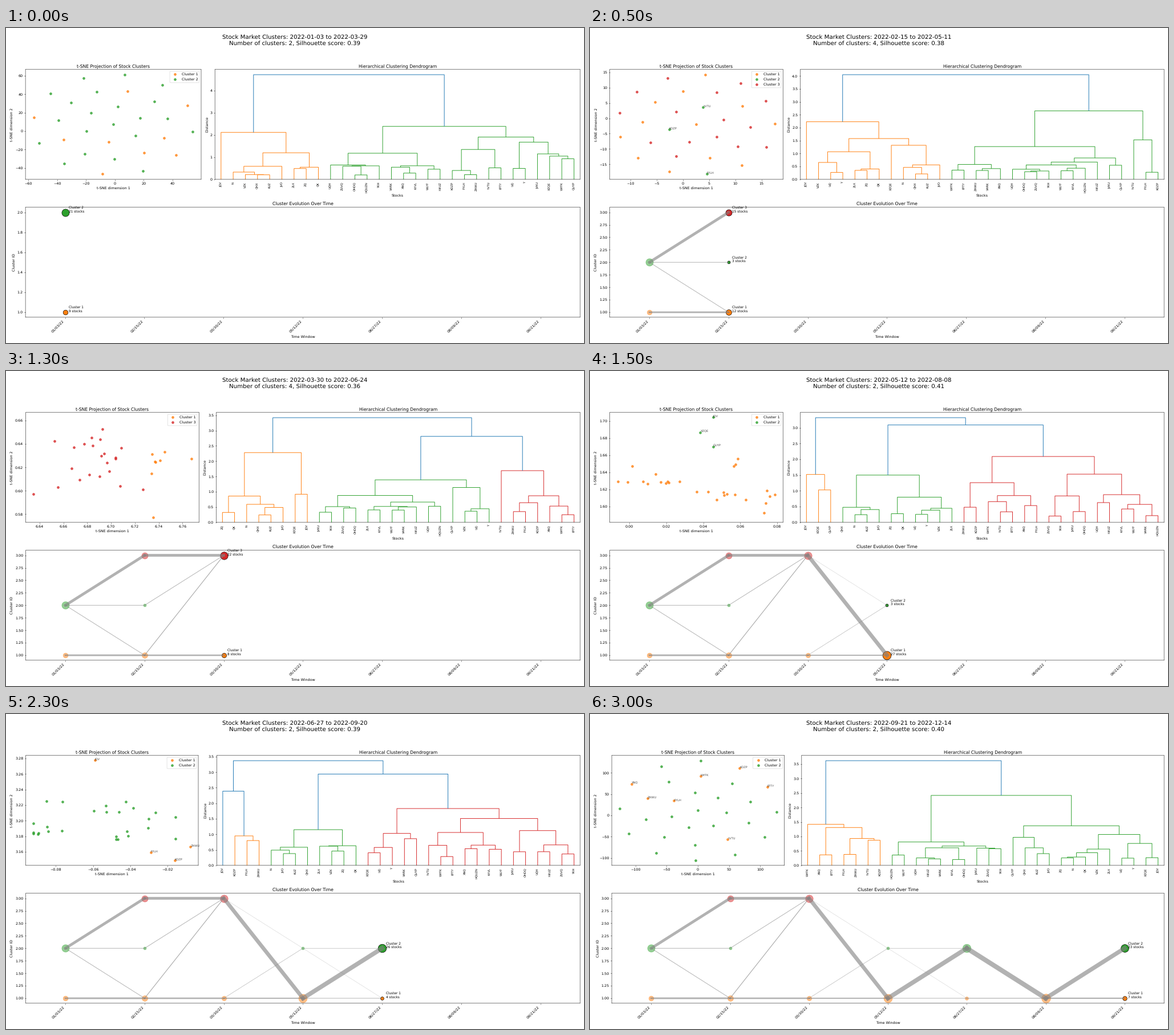
Animation, 1013 px wide and 553 px high, one loop 3500 ms. Source, as a matplotlib script:

```python
from math import cos, radians, sin, tau

import matplotlib.pyplot as plt
import numpy as np
from matplotlib.animation import FuncAnimation

WIDTH, HEIGHT, DPI = 1013, 553, 46
RIGHT = 1006.1
TOP_ROW, BOTTOM_ROW, ROW_HEIGHT = 72.8, 314.8, 193
STOCKS = 30
RING_RADII = (1, 0.69, 0.36)
REACH = 0.5 / 1.1  # half the axes, less the default 5% margins

plt.rcParams.update({"path.snap": False, "text.hinting": "none"})
fig = plt.figure(figsize=((WIDTH + 0.01) / DPI, (HEIGHT + 0.01) / DPI), dpi=DPI)
fig.patch.set_facecolor("white")
heading = fig.suptitle("", fontsize=16)
scatter_ax, tree_ax, flow_ax = (fig.add_axes([0.1, 0.1 + 0.3 * i, 0.3, 0.2]) for i in range(3))

windows = []


def rings(counts, phases, main, members=None):
    """Points on concentric ellipses; all stocks not listed in members join the main cluster."""
    points = []
    for count, phase, radius in zip(counts, phases, RING_RADII):
        for i in range(count):
            angle = radians(90 - phase) - tau * i / count
            points.append((0.5 + REACH * radius * cos(angle), 0.5 + REACH * radius * sin(angle)))
    points.append((0.5, 0.5))
    members = members or {}
    listed = {i for group in members.values() for i in group}
    groups = {cluster: [points[i] for i in group] for cluster, group in members.items()}
    groups[main] = [p for i, p in enumerate(points) if i not in listed]
    return dict(sorted(groups.items()))


def clouds(seed, blobs, outliers=None):
    """Random clouds, each given as (cluster, count, centre x, centre y, spread x, spread y)."""
    rng = np.random.default_rng(seed)
    groups = {cluster: list(points) for cluster, points in (outliers or {}).items()}
    for cluster, count, x, y, dx, dy in blobs:
        cloud = rng.normal((x, y), (dx, dy), (count, 2)).clip(0.5 - REACH, 0.5 + REACH)
        groups.setdefault(cluster, []).extend(cloud)
    return dict(sorted(groups.items()))


def merge_heights(seed, tall):
    """Heights between neighbouring leaves: the tall merges by position, low ones elsewhere."""
    low = np.random.default_rng(seed).uniform(0.2, 0.68, STOCKS - 1)
    return [tall.get(i, h) for i, h in enumerate(low)]


def add_window(start, end, score, count, edges, xlim, ylim, leaves, tall, groups, names=None):
    windows.append(dict(start=start, end=end, score=score, count=count, edges=edges,
                        xlim=xlim, ylim=ylim, leaves=leaves.split(),
                        gaps=merge_heights(len(windows), tall),
                        groups=groups, names=names or {}))


add_window(
    "2022-01-03", "2022-03-29", 0.39, 2, (34.1, 342), (-62.1, 59.8), (-52.5, 67),
    "JQV N VZK QHX KUZ JVO ZLX ZQ QK UQH ZUVQ OHDQ HQUZN YKH VHRK XNQ KYVL WLYF HXUZ "
    "KOZP FYLH ZHWU YVTU EFTY UQ Y JVKU XZQE WYFK QUYP",
    {0: 2.12, 5: 1.2, 8: 4.72, 13: 1.18, 18: 2.39, 21: 1.35, 23: 1.91, 25: 1.68, 26: 1.15,
     27: 1.05, 28: 0.93},
    rings((12, 11, 6), (8, 15, 9), 2, {1: [2, 4, 6, 9, 12, 15, 16, 19, 26]}))

add_window(
    "2022-02-15", "2022-05-11", 0.38, 4, (34.75, 338.2), (-13.95, 19.08), (-19.95, 15.97),
    "JQV VZK UQ Y ZLX ZQ QK XZQE N QHX KUZ JVO WYFK EFTY ZHWU VHRK XNQ UQH OHDQ ZUVQ YKH "
    "WLYF KYVL HQUZN HXUZ JVKU QUYP YVTU FYLH KOZP",
    {0: 2.23, 3: 1.07, 6: 1.58, 7: 1.32, 11: 4.05, 16: 1.27, 24: 0.83, 26: 2.65, 27: 1.53},
    rings((13, 10, 6), (34, -14, 14), 3,
          {1: [2, 4, 6, 7, 8, 12, 13, 15, 18, 21, 22, 29], 2: [5, 23, 27]}),
    {2: "FYLH YVTU KOZP"})

add_window(
    "2022-03-30", "2022-06-24", 0.36, 4, (34.75, 338.2), (6.6284, 6.7739), (0.573, 0.6669),
    "ZQ QK N QHX KUZ JVO XZQE JQV JVKU YKH ZUVQ OHDQ ZLX KYVL WLYF VHRK HXUZ UQH HQUZN "
    "QUYP VZK UQ Y YVTU ZHWU FYLH KOZP XNQ WYFK EFTY",
    {1: 0.86, 5: 2.28, 6: 0.92, 7: 3.42, 11: 0.88, 18: 1.39, 19: 1.14, 22: 2.81, 23: 1.69,
     26: 0.87},
    clouds(2, [(1, 6, 0.74, 0.58, 0.035, 0.055), (3, 21, 0.41, 0.56, 0.13, 0.16)],
           {1: [(0.955, 0.58), (0.735, 0.045)], 3: [(0.045, 0.26)]}))

add_window(
    "2022-05-12", "2022-08-08", 0.41, 2, (34.75, 338.2), (-0.01058, 0.0831), (1.5811, 1.7102),
    "JQV XZQE QUYP QHX N KUZ JVO ZQ QK UQ Y VZK ZLX ZHWU KOZP WYFK YVTU EFTY XNQ FYLH "
    "ZUVQ YKH JVKU OHDQ UQH HXUZ KYVL WLYF VHRK HQUZN",
    {0: 1.52, 1: 1.03, 2: 3.32, 6: 1.5, 8: 0.8, 12: 3.09, 14: 1.26, 17: 0.85, 19: 2.09,
     21: 0.84, 23: 1.53, 25: 0.88},
    clouds(3, [(1, 12, 0.26, 0.38, 0.15, 0.04), (1, 7, 0.67, 0.22, 0.06, 0.055),
               (1, 3, 0.735, 0.56, 0.02, 0.03), (1, 5, 0.9, 0.18, 0.04, 0.1)],
           {2: [(0.596, 0.955), (0.523, 0.82), (0.597, 0.69)]}),
    {2: "JQV XZQE QUYP"})

add_window(
    "2022-06-27", "2022-09-20", 0.39, 2, (34.75, 337), (-0.09615, -0.0036), (3.1426, 3.2838),
    "JQV KOZP FYLH ZHWU N JVO KUZ QHX ZLX VZK ZQ QK XZQE UQ Y VHRK QUYP YVTU WYFK EFTY "
    "XNQ HQUZN KYVL WLYF JVKU OHDQ UQH HXUZ ZUVQ YKH",
    {0: 2.39, 1: 0.95, 2: 0.8, 3: 3.37, 7: 1.15, 11: 2.94, 14: 1.03, 15: 0.86, 16: 1.83,
     19: 1.06, 23: 1.51, 25: 1.12},
    clouds(4, [(2, 8, 0.11, 0.29, 0.06, 0.04), (2, 11, 0.54, 0.53, 0.22, 0.05),
               (2, 7, 0.62, 0.28, 0.12, 0.07)],
           {1: [(0.4, 0.955), (0.955, 0.17), (0.725, 0.12), (0.863, 0.045)]}),
    {1: "JQV ZHWU FYLH KOZP"})

add_window(
    "2022-08-09", "2022-11-01", 0.38, 2, (34.75, 337.5), (-90.4, 103.3), (-92, 97.2),
    "WYFK YVTU FYLH EFTY ZHWU KOZP QHX KUZ JVO N ZQ QK VHRK Y JQV QUYP VZK XZQE ZLX UQ "
    "UQH HXUZ YKH ZUVQ OHDQ KYVL JVKU XNQ HQUZN WLYF",
    {0: 0.93, 1: 1.32, 3: 1.13, 5: 3.36, 11: 2.32, 12: 1.11, 15: 1.88, 19: 1.21, 24: 0.99,
     26: 0.77},
    rings((13, 11, 5), (16, 8, -8), 1))

add_window(
    "2022-09-21", "2022-12-14", 0.40, 2, (38.1, 340.6), (-138.1, 138.7), (-117.5, 140.7),
    "WYFK XNQ EFTY FYLH ZHWU YVTU KOZP HQUZN WLYF UQH HXUZ VHRK KYVL OHDQ JVKU ZUVQ YKH "
    "QUYP QHX KUZ JVO ZQ N QK VZK ZLX UQ Y XZQE JQV",
    {0: 1.42, 2: 1.31, 4: 0.93, 5: 0.87, 6: 3.62, 8: 0.81, 16: 2.42, 17: 0.97, 20: 1.37,
     25: 1.07, 27: 0.76},
    rings((12, 10, 7), (2, 3, 45), 2, {1: [1, 2, 10, 12, 16, 20, 27]}),
    {1: "KOZP EFTY XNQ WYFK YVTU ZHWU FYLH"})

# (from cluster, to cluster, stocks moved) between consecutive windows.
flows = [
    [(1, 1, 9), (2, 1, 3), (2, 2, 3), (2, 3, 15)],
    [(1, 1, 8), (1, 3, 4), (2, 3, 3), (3, 3, 15)],
    [(1, 1, 6), (1, 2, 2), (3, 1, 21), (3, 2, 1)],
    [(1, 1, 3), (1, 2, 24), (2, 1, 1), (2, 2, 2)],
    [(1, 1, 4), (2, 1, 26)],
    [(1, 1, 7), (1, 2, 23)],
]


def place(ax, left, right, top):
    ax.clear()
    ax.set_position([left / WIDTH, 1 - (top + ROW_HEIGHT) / HEIGHT,
                     (right - left) / WIDTH, ROW_HEIGHT / HEIGHT])


def draw_scatter(ax, window):
    for cluster, points in window["groups"].items():
        ax.scatter(*zip(*points), s=36, alpha=0.8, color=f"C{cluster}",
                   label=f"Cluster {cluster}", transform=ax.transAxes)
        for name, (x, y) in zip(window["names"].get(cluster, "").split(), points):
            ax.text(x, y, name, fontsize=8, alpha=0.7, transform=ax.transAxes)
    ax.legend(loc="upper right")
    ax.set(xlim=window["xlim"], ylim=window["ylim"], title="t-SNE Projection of Stock Clusters",
           xlabel="t-SNE dimension 1", ylabel="t-SNE dimension 2")


def draw_tree(ax, leaves, gaps):
    peak = max(gaps)
    used = 0

    def merge(first, last, color):
        nonlocal used
        if first == last:
            return 5 + 10 * first, 0
        split = max(range(first, last), key=lambda i: gaps[i])
        height = gaps[split]
        if color == "C0" and height < 0.7 * peak:
            used += 1
            color = f"C{used}"
        x1, y1 = merge(first, split, color)
        x2, y2 = merge(split + 1, last, color)
        ax.plot([x1, x1, x2, x2], [y1, height, height, y2], color=color, lw=1.5,
                solid_capstyle="butt", solid_joinstyle="miter")
        return (x1 + x2) / 2, height

    merge(0, len(leaves) - 1, "C0")
    ax.set_xticks([5 + 10 * i for i in range(len(leaves))], leaves, rotation=90, fontsize=8)
    for tick in ax.get_xticklines():
        tick.set_visible(False)
    ax.set(xlim=(0, 10 * len(leaves)), ylim=(0, 1.05 * peak),
           title="Hierarchical Clustering Dendrogram", xlabel="Stocks", ylabel="Distance")


def draw_flow(ax, current):
    for step in range(current + 1):
        for cluster, points in windows[step]["groups"].items():
            size = len(points)
            if step < current:
                ax.scatter(step, cluster, s=20 * size, color=f"C{cluster}", alpha=0.5)
                continue
            ax.scatter(step, cluster, s=20 * size, color=f"C{cluster}", edgecolor="black")
            ax.annotate(f"Cluster {cluster}\n{size} stocks", (step, cluster), xytext=(10, 0),
                        textcoords="offset points", fontsize=9)
    for step, moves in enumerate(flows[:current]):
        for start, end, count in moves:
            ax.plot([step, step + 1], [start, end], color="gray", alpha=0.6, lw=count / 2)

    top = 2 if current == 0 else 3
    margin = 0.05 * (top - 1)
    dates = [w["start"].split("-") for w in windows]
    ax.set_xticks(range(len(windows)), [f"{m}/{d}/{y[2:]}" for y, m, d in dates],
                  rotation=45, ha="right")
    ax.set(xlim=(-0.5, len(windows) - 0.5), ylim=(1 - margin, top + margin),
           title="Cluster Evolution Over Time", xlabel="Time Window", ylabel="Cluster ID")


def draw(index):
    window = windows[index]
    left, split = window["edges"]
    gutter = (RIGHT - left - 3 * (split - left)) / 2
    place(scatter_ax, left, split, TOP_ROW)
    place(tree_ax, split + gutter, RIGHT, TOP_ROW)
    place(flow_ax, left, RIGHT, BOTTOM_ROW)

    heading.set_text(f"Stock Market Clusters: {window['start']} to {window['end']}\n"
                     f"Number of clusters: {window['count']}, "
                     f"Silhouette score: {window['score']:.2f}")
    draw_scatter(scatter_ax, window)
    draw_tree(tree_ax, window["leaves"], window["gaps"])
    draw_flow(flow_ax, index)
    return []


animation = FuncAnimation(fig, draw, frames=len(windows), interval=500,
                          repeat=True, repeat_delay=0, blit=False)
plt.show()
```
